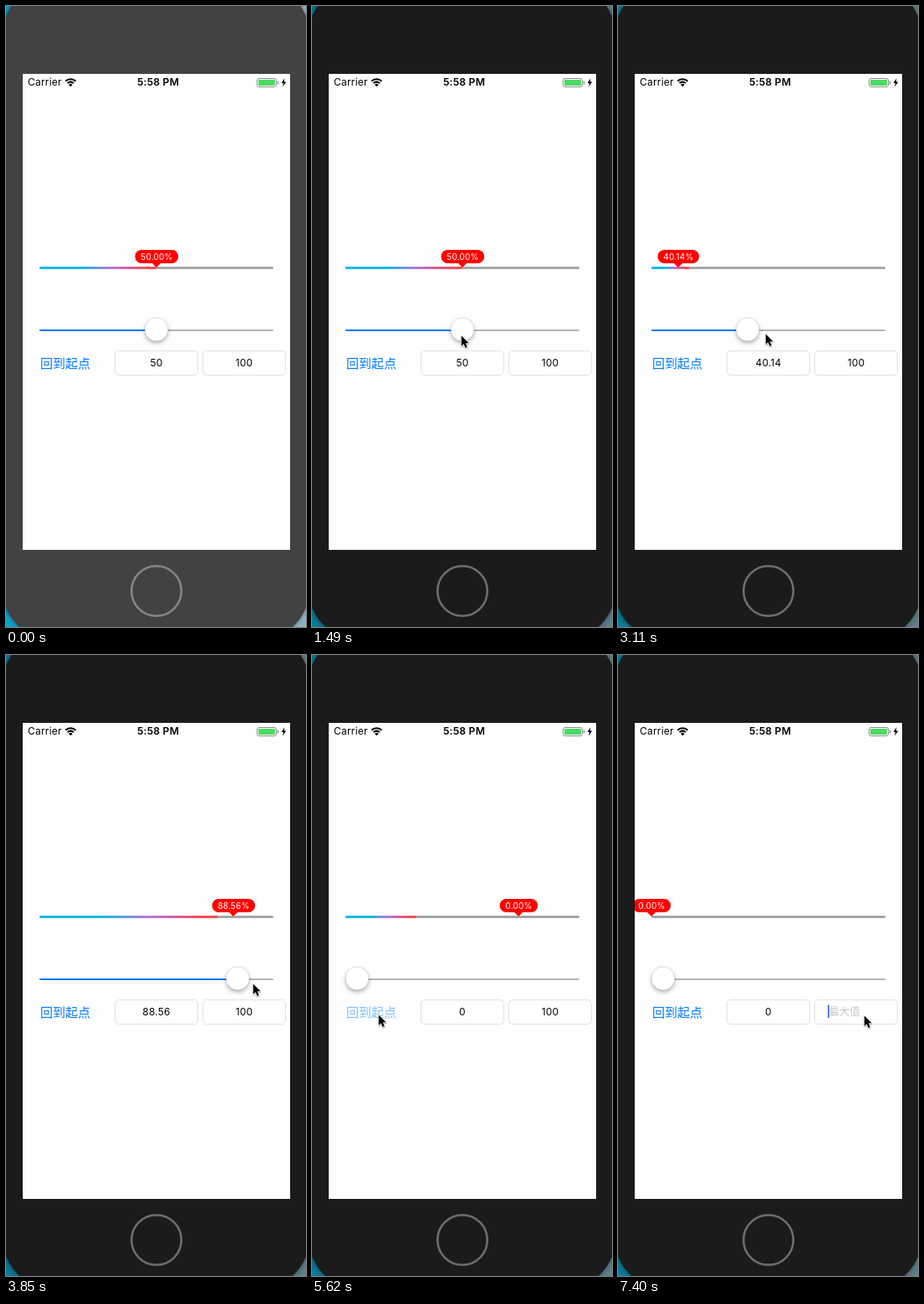
An HTML page with a canvas that plays this animation: 359 px wide and 741 px high, repeating every 8000 ms.

```html
<!DOCTYPE html>
<html lang="zh">
<head>
<meta charset="utf-8">
<title>Progress slider</title>
<style>
html, body { margin: 0; width: 100%; height: 100%; overflow: hidden; background: #1b1b1b; }
canvas { display: block; width: 359px; height: 741px; }
</style>
</head>
<body>
<canvas id="stage"></canvas>
<script>
const W = 359, H = 741, LOOP = 8000, TICK = 147.75;
const SANS = 'Inter, Roboto, sans-serif';
const CJK = '"Noto Sans CJK SC", "Noto Sans CJK", "Noto Sans CJK JP", sans-serif';
const BLUE = '#007aff', RED = '#ff0000';

// Times are in ticks: the picture only changes once per tick.
const EDIT = 45, ERASE = 48, RESET = 37;

const canvas = document.getElementById('stage');
const ratio = window.devicePixelRatio || 1;
canvas.width = W * ratio;
canvas.height = H * ratio;
const c = canvas.getContext('2d');

// Drag turning points: tick, percent, bubble x, fill end x (the last two lag behind).
const drag = [
  [12, 50, 180, 180],
  [18, 7, 104, 102],
  [21, 40.14, 72, 85],
  [26, 88.56, 272, 253],
  [30, 95.57, 307.5, 307.5]
];
// Pointer waypoints: tick, x, y.
const pointer = [
  [3, 200, 258], [7, 189, 412], [10, 178, 392], [12, 178, 392],
  [18, 67, 390], [21, 176, 390], [26, 295, 391], [30, 300, 392],
  [33, 160, 452], [36, 79, 428], [38, 79, 428], [41, 185, 437], [43, 294, 429]
];

// Smooth curve through column k; it comes to rest at its turning points and ends.
function curve(keys, k, t) {
  const last = keys.length - 1;
  if (t <= keys[0][0]) return keys[0][k];
  if (t >= keys[last][0]) return keys[last][k];
  const i = keys.findIndex(p => p[0] > t) - 1;
  const rise = j => keys[j + 1][k] - keys[j][k];
  const slope = j => j < 1 || j >= last || rise(j - 1) * rise(j) <= 0 ? 0
    : (keys[j + 1][k] - keys[j - 1][k]) / (keys[j + 1][0] - keys[j - 1][0]);
  const span = keys[i + 1][0] - keys[i][0], u = (t - keys[i][0]) / span;
  const s = u * u * (3 - 2 * u);
  return keys[i][k] + rise(i) * s
    + span * u * (1 - u) * (slope(i) * (1 - u) - slope(i + 1) * u);
}

function ease(t, start, span) {
  const u = Math.min(1, Math.max(0, (t - start) / span));
  return u * u * (3 - 2 * u);
}

function box(x, y, w, h, r) {
  c.beginPath();
  c.roundRect(x, y, w, h, r);
}

function fill(color) {
  c.fillStyle = color;
  c.fill();
}

function stroke(color, width) {
  c.strokeStyle = color;
  c.lineWidth = width;
  c.stroke();
}

function circle(x, y, r) {
  c.beginPath();
  c.arc(x, y, r, 0, 2 * Math.PI);
}

function line(x1, x2, y, width, color, cap = 'butt') {
  c.beginPath();
  c.moveTo(x1, y);
  c.lineTo(x2, y);
  c.lineCap = cap;
  stroke(color, width);
}

function poly(points, color) {
  c.beginPath();
  for (const [x, y] of points) c.lineTo(x, y);
  c.closePath();
  fill(color);
}

function shadow(alpha, blur, dy = 0) {
  c.shadowColor = `rgba(0,0,0,${alpha})`;
  c.shadowBlur = blur * ratio;
  c.shadowOffsetY = dy * ratio;
}

function setFont(font) {
  c.font = font;
  c.letterSpacing = font.includes(CJK) ? '0px' : '0.2px';
}

function label(text, x, y, font, color, align = 'center') {
  setFont(font);
  c.textAlign = align;
  c.fillStyle = color;
  c.fillText(text, x, y);
}

function device(dim) {
  const wall = c.createLinearGradient(0, 0, W, 0);
  wall.addColorStop(0, dim ? '#0aa0c2' : '#0a7d9c');
  wall.addColorStop(1, dim ? '#8fb4c2' : '#5f828e');
  c.fillStyle = wall;
  c.fillRect(0, 0, W, H);
  c.save();
  shadow(.45, dim ? 5 : 10);
  box(-4, -26, 367, 782, 60);
  fill(dim ? '#424242' : '#1b1b1b');
  c.restore();
  circle(180, 698, 29.8);
  stroke(dim ? '#858585' : '#6e6e6e', 2.6);
  c.fillStyle = '#fefefe';
  c.fillRect(20, 81, 320, 568);
}

function statusBar() {
  label('Carrier', 26, 95.4, '12px ' + SANS, '#000', 'left');
  label('5:58 PM', 182, 95.4, '600 12.2px ' + SANS, '#000');

  // Wi-Fi fan
  const from = -Math.PI * .75, to = -Math.PI * .25;
  c.lineCap = 'butt';
  for (const r of [5.2, 8.6]) {
    c.beginPath();
    c.arc(77.3, 95.8, r, from, to);
    stroke('#000', 2.1);
  }
  c.beginPath();
  c.moveTo(77.3, 96.2);
  c.arc(77.3, 96.2, 3.2, from, to);
  fill('#000');

  // Battery
  box(300.5, 86.5, 23, 10, 2.5);
  stroke('#8c8c8c', 1);
  box(302, 88, 20, 7, 1);
  fill('#4cd964');
  box(324.8, 89.5, 1.4, 4, [0, 1, 1, 0]);
  fill('#8c8c8c');
  poly([[333.4, 86.2], [329.6, 92], [332, 92], [331, 96.6], [335.2, 90.4], [332.7, 90.4]], '#000');
}

function progress(end, x, value) {
  line(41.4, 318.6, 312.5, 2.8, '#a6a6a6', 'round');
  if (end > 41) {
    const g = c.createLinearGradient(40, 0, end, 0);
    g.addColorStop(.36, '#1abbe4');
    g.addColorStop(.61, '#b57ade');
    g.addColorStop(.92, '#f84c54');
    box(40, 311.1, end - 40, 2.8, [1.4, 0, 0, 1.4]);
    fill(g);
  }
  const text = value.toFixed(2) + '%', font = '10px ' + SANS;
  setFont(font);
  const w = c.measureText(text).width + 13.5;
  box(x + .3 - w / 2, 291, w, 16, 8);
  fill(RED);
  poly([[x - 5.5, 306.5], [x + 5.5, 306.5], [x, 312]], RED);
  label(text, x + .4, 302.6, font, '#fff');
}

function slider(value) {
  const x = 54 + value * 2.52;
  line(41, 319, 387, 2, '#b5b5b5', 'round');
  if (value > 0) line(41, x, 387, 2, BLUE, 'round');
  c.save();
  shadow(.3, 5, 2.5);
  circle(x, 386, 13.8);
  fill('#fff');
  c.restore();
  circle(x, 386, 14);
  stroke('rgba(0,0,0,.18)', .5);
}

function field(x, text, center = x + 50) {
  box(x + .5, 411.5, 99, 29, 4.5);
  stroke('#e2e2e2', 1);
  label(text, center, 430, '12px ' + SANS, '#000');
}

function clearButton(x, y) {
  circle(x, y, 7);
  fill('#c2c2c6');
  c.save();
  c.translate(x, y);
  c.rotate(Math.PI / 4);
  line(-3.6, 3.6, 0, 1.1, '#fff');
  c.rotate(Math.PI / 2);
  line(-3.6, 3.6, 0, 1.1, '#fff');
  c.restore();
}

function maxField(tick) {
  if (tick < EDIT) return field(235, '100');
  const mid = 271, left = Math.min(3, Math.max(0, ERASE + 2 - tick));
  const text = '100'.slice(0, left);
  field(235, text, mid);
  let caret = 251;
  if (text) {
    caret = mid + c.measureText(text).width / 2 + .5;
    clearButton(320.5, 425.5);
  } else {
    label('最大值', mid, 430, '12.5px ' + CJK, '#c7c7cd');
  }
  c.fillStyle = '#426bd8';
  c.fillRect(caret, 417.5, 1.7, 15.5);
}

function arrow(x, y) {
  const shape = [[0, 0], [0, 14.6], [3.3, 11.6], [5.7, 17.2], [8.3, 16.1], [5.9, 10.6], [10.4, 10.4]];
  c.save();
  c.translate(x + .8, y + 1.4);
  c.scale(.84, .84);
  shadow(.3, 1.5, 1);
  poly(shape, '#000');
  stroke('#fff', 1.6);
  c.shadowColor = 'transparent';
  poly(shape, '#000');
  c.restore();
}

function draw(ms) {
  const tick = Math.min(53, Math.floor(ms / TICK));
  const value = tick > RESET ? 0 : curve(drag, 1, tick);
  // Going back to the start: the fill shrinks faster than the bubble travels.
  const back = (k, span) => 40 + (curve(drag, k, tick) - 40) * (1 - ease(tick, RESET, span));
  c.setTransform(ratio, 0, 0, ratio, 0, 0);
  device(tick === 0);
  c.save();
  c.beginPath();
  c.rect(20, 81, 320, 568);
  c.clip();
  statusBar();
  progress(back(3, 1.6), back(2, 3.25), value);
  slider(value);
  const pressed = tick > RESET && tick < RESET + 2;
  label('回到起点', 71, 431.6, '15px ' + CJK, pressed ? '#80bdff' : BLUE);
  field(130, String(+value.toFixed(2)));
  maxField(tick);
  if (tick >= pointer[0][0]) arrow(curve(pointer, 1, tick), curve(pointer, 2, tick));
  c.restore();
}

const start = performance.now();
function loop() {
  draw((performance.now() - start) % LOOP);
  requestAnimationFrame(loop);
}
loop();
</script>
</body>
</html>
```
